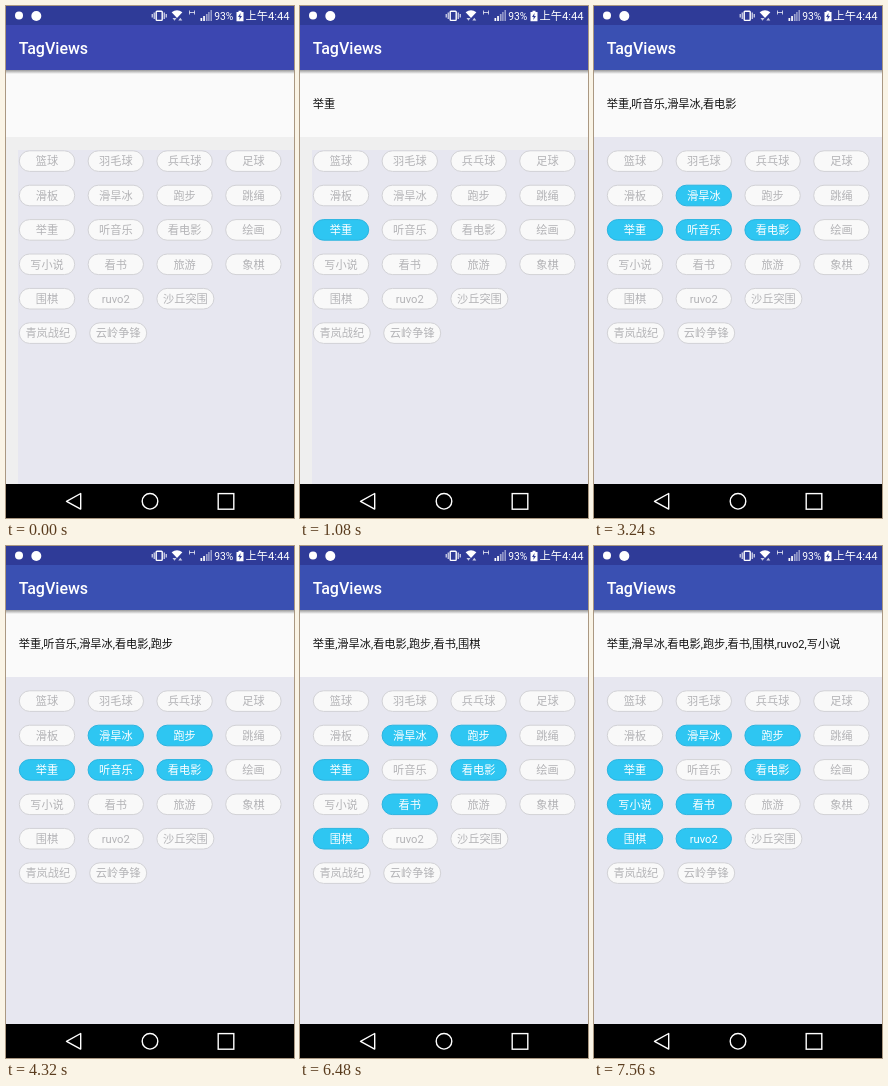
An HTML page for the animation above (8 s loop, 288 by 512 pixels).

```html
<!DOCTYPE html>
<html lang="zh-CN">
<head>
<meta charset="utf-8">
<title>TagViews</title>
<style>
  html, body { margin: 0; width: 100%; height: 100%; overflow: hidden; background: #000; }
  svg { display: block; width: 288px; height: 512px; }
  text { font: 11.2px Roboto, "Noto Sans CJK SC", "Noto Sans CJK", sans-serif; }
  .tag rect { fill: #f9f9f9; stroke: #d2d2d6; }
  .tag text { fill: #b3b3b6; text-anchor: middle; }
  .tag.on rect { fill: #2ec6f2; stroke: #2bb4e0; }
  .tag.on text { fill: #fff; }
  .line { fill: none; stroke: #fff; }
</style>
</head>
<body>
<svg viewBox="0 0 288 512">
  <defs>
    <linearGradient id="shade" x2="0" y2="1">
      <stop stop-color="#999"/>
      <stop offset="1" stop-color="#fafafa"/>
    </linearGradient>
  </defs>
  <rect id="page" y="131" width="288" height="347"/>
  <rect id="list" x="12" y="144" width="276" height="334" fill="#e7e7f0"/>
  <rect y="64" width="288" height="67" fill="#fafafa"/>
  <rect y="64" width="288" height="4" fill="url(#shade)"/>
  <rect id="bar" y="19" width="288" height="45"/>
  <rect width="288" height="19" fill="#2f3b98"/>
  <text x="12.8" y="48.2" fill="#fff" style="font-size:16px;font-weight:500">TagViews</text>

  <g id="status" fill="#fff">
    <circle cx="13" cy="9.5" r="4"/>
    <circle cx="30.3" cy="10" r="5"/>
    <rect class="line" x="150.2" y="5.2" width="6" height="9.2" rx=".8" stroke-width="1.4"/>
    <path class="line" d="M148.2 6.5v6.5M158.2 6.5v6.5M146.2 8v3.5M160.2 8v3.5" stroke-width="1"/>
    <path d="M165.6 6.3q5.4-4 10.8 0l-5.4 5.6z"/>
    <path d="M166.5 12h4l-2 2.8zM172.3 14.6h4l-2-2.8z" opacity=".75"/>
    <path class="line" d="M183.5 4.5v4M188.5 4.5v4M183.5 6.5h5" stroke-width=".9" opacity=".8"/>
    <path d="M194.5 12h1.7v3h-1.7zM197.2 10h1.7v5h-1.7z"/>
    <path d="M199.9 8h1.7v7h-1.7zM202.2 6h1.4v9h-1.4zM204.5 4h1.4v11h-1.4z" opacity=".55"/>
    <text x="208.2" y="13.8" style="font-size:10.3px">93%</text>
    <path d="M230.5 6h2V4.8h3V6h2v9.2h-7z"/>
    <path d="M234.6 7l-2.6 4h1.7l-.4 3 2.7-4h-1.8z" fill="#2f3b98"/>
    <text x="239.6" y="13.9">上午4:44</text>
  </g>

  <text id="chosen" x="12.8" y="102" fill="#111"></text>
  <g id="tags"></g>

  <rect y="478" width="288" height="34" fill="#000"/>
  <g class="line" stroke-width="1.4">
    <path d="M60.5 495.3L74.7 487.5v15.6z" stroke-linejoin="round"/>
    <circle cx="144" cy="495.3" r="7.8"/>
    <rect x="212.2" y="487.6" width="15.6" height="15.6"/>
  </g>
</svg>
<script>
const STEP = 1080, LOOP = 8000;
const rows = [
  '篮球 羽毛球 兵乓球 足球',
  '滑板 滑旱冰 跑步 跳绳',
  '举重 听音乐 看电影 绘画',
  '写小说 看书 旅游 象棋',
  '围棋 ruvo2 沙丘突围',
  '青岚战纪 云岭争锋'
];
const picks = [
  '',
  '举重',
  '举重,听音乐,滑旱冰',
  '举重,听音乐,滑旱冰,看电影',
  '举重,听音乐,滑旱冰,看电影,跑步',
  '举重,滑旱冰,看电影,跑步,看书',
  '举重,滑旱冰,看电影,跑步,看书,围棋',
  '举重,滑旱冰,看电影,跑步,看书,围棋,ruvo2,写小说'
];
const $ = id => document.getElementById(id);
const tags = new Map();

function make(parent, name, attrs) {
  const node = document.createElementNS('http://www.w3.org/2000/svg', name);
  for (const key in attrs) node.setAttribute(key, attrs[key]);
  return parent.appendChild(node);
}

rows.forEach((row, r) => {
  let x = 13.3;
  const y = 144.8 + r * 34.4;
  row.split(' ').forEach(name => {
    const width = name.length > 3 && name !== 'ruvo2' ? 57 : 55.4;
    const tag = make($('tags'), 'g', { class: 'tag' });
    make(tag, 'rect', { x, y, width, height: 20.6, rx: 10.3 });
    make(tag, 'text', { x: x + width / 2, y: y + 14.5 }).textContent = name;
    tags.set(name, tag);
    x += width + 13.4;
  });
});

function show(step) {
  const names = picks[step].split(',');
  $('chosen').textContent = picks[step];
  tags.forEach((tag, name) => tag.classList.toggle('on', names.includes(name)));
  $('page').setAttribute('fill', step < 2 ? '#efefef' : '#e7e7f0');
  $('bar').setAttribute('fill', step < 3 ? '#3c47b1' : '#3a50b2');
}

const start = performance.now();
let shown = -1;
function tick() {
  const step = Math.floor((performance.now() - start) % LOOP / STEP);
  if (step !== shown) show(shown = step);
  requestAnimationFrame(tick);
}
tick();
</script>
</body>
</html>
```
